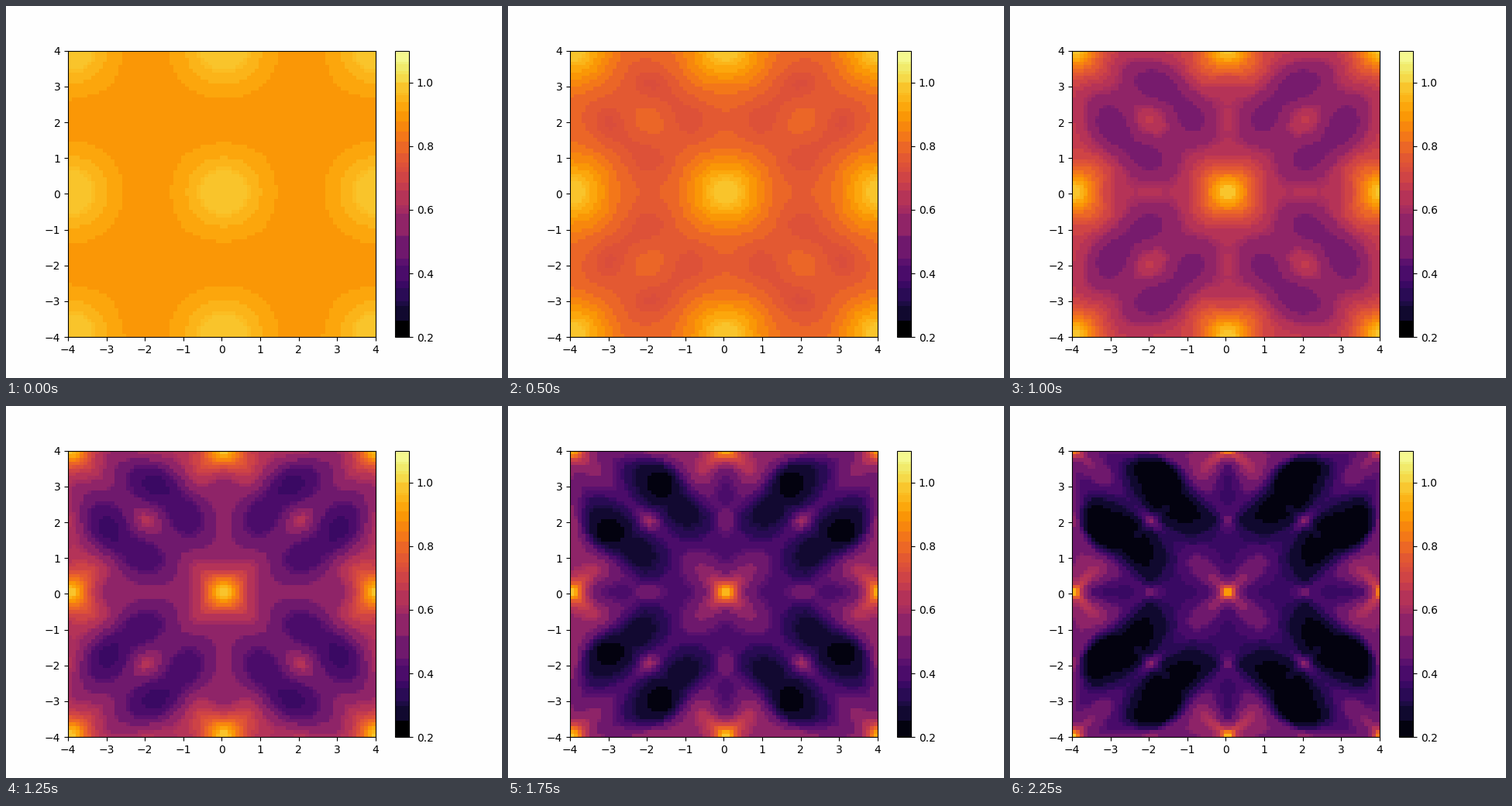
Recreate the animation shown at these times as a matplotlib script. Size 640 by 480 pixels, loop 2.5 s.

```python
import numpy as np
import matplotlib.pyplot as plt
from matplotlib.animation import FuncAnimation
from matplotlib.colors import ListedColormap

FRAMES, INTERVAL = 10, 250
VMIN, VMAX, PEAK = 0.2, 1.1, 0.989
CELL_PX, BAR_PX, INK_PX = 23, 26, 3000

# Tetrahedron corners; each column is also a sign pattern over the four sites.
SITES = np.array([[1, 1, 1], [1, -1, -1], [-1, 1, -1], [-1, -1, 1]])


def mode(weights):
    """Spin mode on the four sites from a pattern-by-component matrix."""
    return (SITES / 2 @ weights).ravel()


def penalty():
    """Energy matrix: the trace mode costs 1.5, the antisymmetric modes 1."""
    trace = mode(np.eye(3) / np.sqrt(3))
    matrix = 1.5 * np.outer(trace, trace)
    for i, j in ((0, 1), (0, 2), (1, 2)):
        weights = np.zeros((3, 3))
        weights[i, j], weights[j, i] = np.sqrt(0.5), -np.sqrt(0.5)
        matrix += np.outer(mode(weights), mode(weights))
    return matrix


grid = np.linspace(-4, 4, 80)
h, k = (a.ravel() for a in np.meshgrid(grid[:-1], grid[:-1]))
phase = np.repeat(np.pi / 4 * (np.outer(h, SITES[:, 0]) + np.outer(k, SITES[:, 1])), 3, axis=1)
energy = penalty() * np.cos(phase[:, :, None] - phase[:, None, :])

# Uniform spin waves along the two directions transverse to (h, k, 0).
q = np.hypot(h, k)
zero = np.zeros_like(q)
in_plane = np.stack([-k / q, h / q, zero], axis=1)
out_plane = np.stack([zero, zero, zero + 1], axis=1)
probes = np.stack([np.tile(d, (1, 4)) / 2 for d in (in_plane, out_plane)], axis=2)


def coupling(n):
    """Effective coupling on a logarithmic cooling schedule."""
    y = np.geomspace(0.05, 300, 4000)
    beta = 0.222 * 10 ** (2 * n / 9)
    return np.interp(beta, y * (1 / 3 + 2 / 3 / (1 + 0.56 * y)), y)


def structure_factor(n):
    response = np.linalg.solve(np.eye(12) + coupling(n) * energy, probes)
    return PEAK * (probes * response).sum(axis=(1, 2)) / 2


INFERNO = np.round(plt.get_cmap("inferno")(np.arange(256))[:, :3] * 255).astype(int)
_, BAND = np.unique(INFERNO // [32, 16, 32], axis=0, return_inverse=True)
BAND = BAND.ravel()


def banded_cmap(values):
    """Merge neighbouring colours into bands, weighted by the area they cover."""
    index = np.clip((values - VMIN) / (VMAX - VMIN) * 256, 0, 255).astype(int)
    area = BAR_PX + CELL_PX * np.bincount(index, minlength=256)
    total = np.bincount(BAND, area)
    total[BAND[0]] += INK_PX
    mean = np.stack([np.bincount(BAND, area * c) / total for c in INFERNO.T], axis=1)
    return ListedColormap(np.floor(mean)[BAND] / 255)


fig, ax = plt.subplots(figsize=(6.4, 4.8), dpi=100, facecolor="#fefefe")
maps = [structure_factor(n) for n in range(FRAMES)]
cmaps = [banded_cmap(m) for m in maps]
mesh = ax.pcolormesh(grid, grid, maps[0].reshape(79, 79), cmap=cmaps[0],
                     vmin=VMIN, vmax=VMAX, shading="flat")
fig.colorbar(mesh)


def update(n):
    mesh.set_array(maps[n].reshape(79, 79))
    mesh.set_cmap(cmaps[n])
    return [mesh]


anim = FuncAnimation(fig, update, frames=FRAMES, interval=INTERVAL, repeat=True, repeat_delay=0)
plt.show()
```
